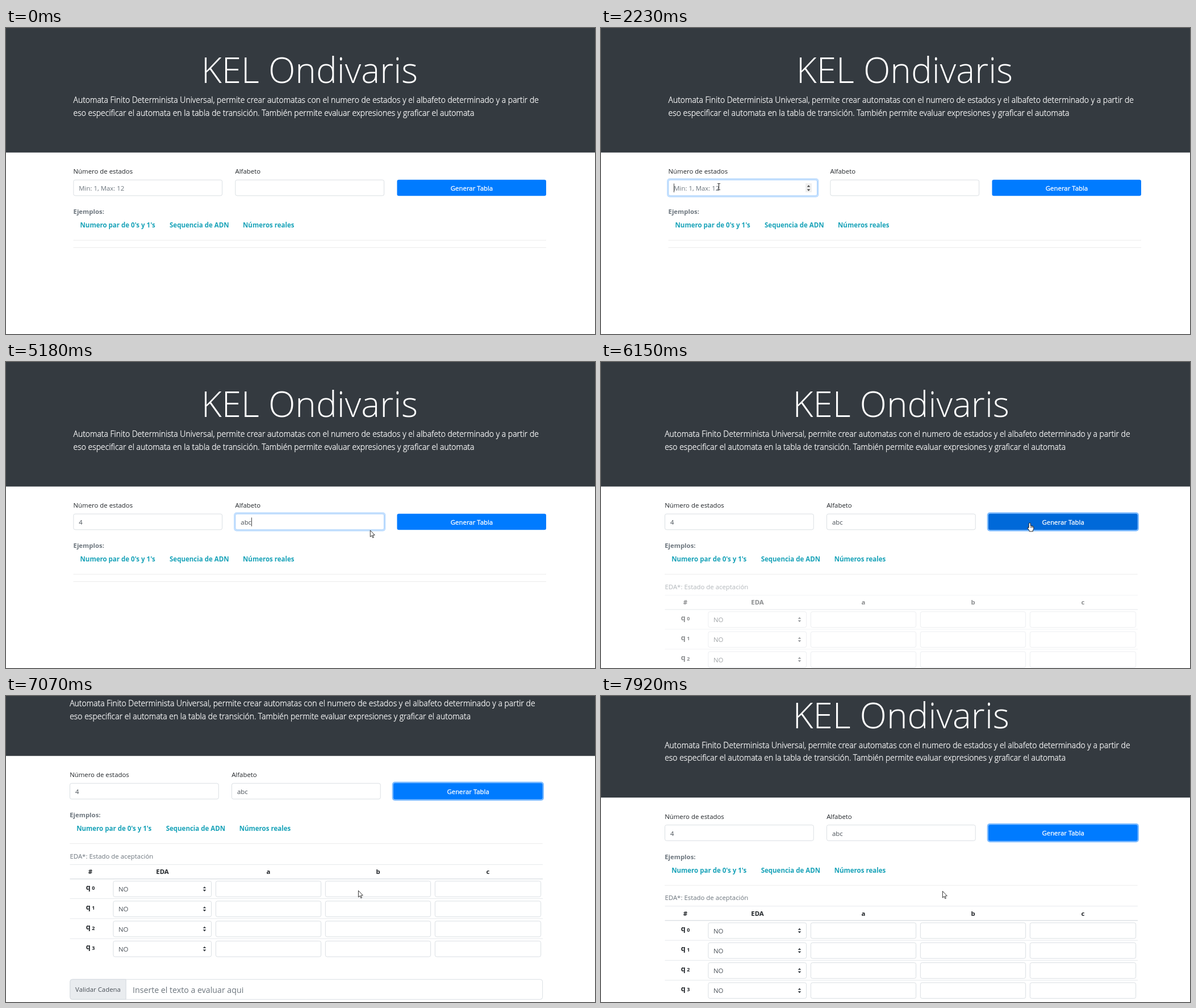
Write an HTML page with a canvas that moves like this. It is 1037x540 px and loops after 8000 ms.

```html
<!DOCTYPE html>
<html lang="es">
<head>
<meta charset="utf-8">
<title>KEL Ondivaris</title>
<style>
html, body { margin: 0; width: 100%; height: 100%; overflow: hidden; background: #fff; }
canvas { display: block; width: 100vw; height: 100vh; }
</style>
</head>
<body>
<canvas id="stage"></canvas>
<script>
const W = 1037, H = 540, LOOP = 8000;
const canvas = document.getElementById('stage');
const ctx = canvas.getContext('2d');

const FONT = '"Open Sans", "Noto Sans", sans-serif';
const INK = '#212529', MUTED = '#6c757d', FIELD = '#495057', EDGE = '#ced4da';
const HAIR = 0.75; // one page pixel at the page zoom

const STATES = { x: 118.5, y: 267.75, w: 262.5, h: 28.5 };
const ALPHABET = { x: 403.5, y: 267.75, w: 262.5, h: 28.5 };
const BUTTON = { x: 688.5, y: 267.75, w: 262.5, h: 28.5 };
const LINKS = [
  { text: "Numero par de 0's y 1's", x: 130.5, y: 339, w: 134, h: 18 },
  { text: 'Sequencia de ADN', x: 288, y: 339, w: 105, h: 18 },
  { text: 'Números reales', x: 417, y: 339, w: 88, h: 18 }
];
const COLUMNS = [['a', 369, 186], ['b', 562, 186], ['c', 755, 187]];
const ROW_TOP = 436.5, ROW_H = 35.25;

// time, x, y of the pointer
const PATH = [
  [380, 874, 507], [620, 640, 440], [820, 400, 382], [960, 256, 350],
  [1160, 205, 280], [1500, 205, 280], [1620, 207.5, 280], [3330, 207.5, 280],
  [3450, 295, 300], [3560, 395, 308], [3720, 504.5, 295], [4800, 504.5, 295],
  [5100, 610, 300], [5480, 755, 284], [6250, 755, 284], [6700, 620, 343],
  [7070, 620, 343], [7150, 622, 343.5], [7640, 622, 343.5], [7920, 601, 344]
];
const HIDDEN = [[0, 380], [2500, 3330], [4270, 4800]];
const CLICKS = [[1240, 1400], [3870, 4120], [5500, 5680]];
const CARET_1 = [[1620, 1760], [2230, 2860], [3160, 3600]];
const CARET_2 = [[3870, 5240]];
const BUILT = 5930, LIVE = 7150;

const clamp = v => Math.max(0, Math.min(1, v));
const ramp = (t, from, to) => clamp((t - from) / (to - from));
const smooth = v => v * v * (3 - 2 * v);
const during = (t, spans) => spans.some(([a, b]) => t >= a && t < b);
const inside = (p, r) => p.x >= r.x && p.x <= r.x + r.w && p.y >= r.y && p.y <= r.y + r.h;

function pointerAt(t) {
  let i = 0;
  while (i < PATH.length - 2 && t >= PATH[i + 1][0]) i++;
  const [t0, x0, y0] = PATH[i], [t1, x1, y1] = PATH[i + 1];
  const k = ramp(t, t0, t1);
  return { x: x0 + (x1 - x0) * k, y: y0 + (y1 - y0) * k };
}

function scrollAt(t) {
  return 114 * smooth(ramp(t, 6775, 7070)) - 73.5 * smooth(ramp(t, 7640, 7920));
}

function text(str, x, y, size, color, weight = 400, align = 'left') {
  ctx.font = `${weight} ${size}px ${FONT}`;
  ctx.textAlign = align;
  ctx.fillStyle = color;
  ctx.fillText(str, x, y);
}

// white text with slightly fuller stems
function lightText(str, x, y, size, weight, align) {
  text(str, x, y, size, '#fff', weight, align);
  ctx.strokeStyle = '#fff';
  ctx.lineWidth = 0.3;
  ctx.lineJoin = 'round';
  ctx.strokeText(str, x, y);
}

function line(x0, x1, y, color, width = HAIR) {
  ctx.fillStyle = color;
  ctx.fillRect(x0, y, x1 - x0, width);
}

function box(r, fill, stroke, radius = 3) {
  ctx.beginPath();
  ctx.roundRect(r.x, r.y, r.w, r.h, radius);
  ctx.fillStyle = fill;
  ctx.fill();
  if (stroke) {
    ctx.beginPath();
    ctx.roundRect(r.x + HAIR / 2, r.y + HAIR / 2, r.w - HAIR, r.h - HAIR, radius);
    ctx.strokeStyle = stroke;
    ctx.lineWidth = HAIR;
    ctx.stroke();
  }
}

function ring(r, alpha) {
  const g = 2.4;
  box({ x: r.x - g, y: r.y - g, w: r.w + 2 * g, h: r.h + 2 * g }, `rgba(0,123,255,${alpha})`, null, 5);
}

function input(r, focus = 0) {
  if (focus > 0) ring(r, 0.25 * focus);
  box(r, '#fff', EDGE);
  if (focus > 0) box(r, '#fff', `rgba(128,189,255,${focus})`);
}

function polygon(points, fill, stroke) {
  ctx.beginPath();
  points.forEach(([x, y]) => ctx.lineTo(x, y));
  ctx.closePath();
  ctx.fillStyle = fill;
  ctx.fill();
  if (stroke) {
    ctx.strokeStyle = stroke;
    ctx.lineWidth = 0.9;
    ctx.lineJoin = 'round';
    ctx.stroke();
  }
}

function arrows(x, y, gap, color) {
  for (const s of [-1, 1])
    polygon([[x - 2.8, y + s * gap], [x + 2.8, y + s * gap], [x, y + s * (gap + 3.2)]], color);
}

function spinner(r) {
  const x = r.x + r.w - 15.5, y = r.y + r.h / 2;
  ctx.fillStyle = '#efefef';
  ctx.fillRect(x - 5.5, y - 8, 11, 16);
  arrows(x, y + 0.5, 2, '#444');
}

function caret(x) {
  ctx.fillStyle = '#444';
  ctx.fillRect(Math.round(x), 274.5, 1, 15.5);
}

function header() {
  ctx.fillStyle = '#343a40';
  ctx.fillRect(-20, 0, W + 40, 219.75);
  text('KEL Ondivaris', 534.5, 97, 62, '#fff', 300, 'center');
  lightText('Automata Finito Determinista Universal, permite crear automatas con el numero de estados y el albafeto determinado y a partir de',
    118.5, 132, 14, 300, 'left');
  lightText('eso especificar el automata en la tabla de transición. También permite evaluar expresiones y graficar el automata',
    118.5, 154.5, 14, 300, 'left');
}

function form(t, p) {
  const focus1 = t < 1620 ? 0 : 1 - ramp(t, 3890, 4050);
  const focus2 = ramp(t, 3890, 4050) * (1 - ramp(t, 5820, 5960));
  const focus3 = ramp(t, 5800, 5880);

  text('Número de estados', 118.5, 257, 11.4, INK);
  text('Alfabeto', 403.5, 257, 11.4, INK);

  input(STATES, focus1);
  if (t < 3160) text('Min: 1, Max: 12', 128.3, 287, 11.4, MUTED);
  else text('4', 128.3, 287, 11.4, FIELD);
  if (inside(p, STATES) || (t >= 1620 && t < 3870)) spinner(STATES);
  if (during(t, CARET_1)) caret(t < 3160 ? 128 : 135);

  const typed = 'abc'.slice(0, [4270, 4570, 4740].filter(k => t >= k).length);
  input(ALPHABET, focus2);
  text(typed, 413.3, 287, 11.4, FIELD);
  if (during(t, CARET_2)) caret(413.3 + ctx.measureText(typed).width);

  if (focus3 > 0) ring(BUTTON, 0.5 * focus3);
  box(BUTTON, inside(p, BUTTON) ? '#0069d9' : '#007bff');
  lightText('Generar Tabla', 820, 286.5, 11.4, 400, 'center');
}

function examples(p) {
  text('Ejemplos:', 118.5, 328, 11.4, MUTED, 700);
  for (const l of LINKS) {
    const over = inside(p, l);
    const color = over ? '#0f6674' : '#17a2b8';
    text(l.text, l.x, 352, 11.5, color, 700);
    if (over) line(l.x, l.x + l.w, 353.5, color);
  }
  line(118.5, 951, 374.25, 'rgba(0,0,0,.1)');
}

function suggestions(t) {
  if (t < 3890 || t >= 4740) return;
  const items = t < 4270 ? ['ab', 'abc', 'fdfd', '01'] : ['ab', 'abc'];
  ctx.save();
  ctx.shadowColor = 'rgba(0,0,0,.35)';
  ctx.shadowBlur = 3;
  ctx.shadowOffsetY = 1;
  ctx.fillStyle = '#fff';
  ctx.fillRect(403.5, 297, 262.5, 12 + 27 * items.length);
  ctx.restore();
  items.forEach((s, i) => text(s, 413, 320.5 + 27 * i, 9.7, INK));
}

const cell = (i, x, w) => ({ x, y: ROW_TOP + 3.75 + i * ROW_H, w, h: 28.5 });

function table(p, live) {
  text('EDA*: Estado de aceptación', 112.5, 400.5, 11.4, MUTED);
  line(112.5, 945, 411, '#dee2e6');
  [['#', 148.5], ['EDA', 275.5], ['a', 462], ['b', 655], ['c', 848.5]]
    .forEach(([s, x]) => text(s, x, 428, 11.4, INK, 700, 'center'));

  for (let i = 0; i < 4; i++) {
    const y = ROW_TOP + i * ROW_H;
    if (live && inside(p, { x: 112.5, y, w: 832.5, h: ROW_H })) {
      ctx.fillStyle = '#ececec';
      ctx.fillRect(112.5, y, 832.5, ROW_H);
    }
    line(112.5, 945, y - 0.5, '#dee2e6', i ? HAIR : 2 * HAIR);
    text('q', 140.8, y + 19, 12.5, INK, 700);
    text(String(i), 151.2, y + 19.5, 9, INK, 700);

    const choice = cell(i, 188.5, 173.5);
    input(choice);
    text('NO', 198, y + 22.5, 11.4, FIELD);
    arrows(349.5, choice.y + 14.3, 1.2, '#343a40');
    for (const [, x, w] of COLUMNS) {
      const r = cell(i, x, w);
      input(r);
      if (live && inside(p, r)) spinner(r);
    }
  }

  const r = { x: 112.5, y: 613.75, w: 832.5, h: 36 };
  box(r, '#fff', EDGE, 4);
  box({ x: r.x, y: r.y, w: 99, h: r.h }, '#e9ecef', EDGE, [4, 0, 0, 4]);
  text('Validar Cadena', 162, 636, 11.4, FIELD, 400, 'center');
  text('Inserte el texto a evaluar aqui', 223, 638, 14.2, MUTED);
}

function pointer(p, kind) {
  ctx.save();
  ctx.translate(p.x, p.y);
  if (kind === 'beam') {
    ctx.fillStyle = '#222';
    ctx.fillRect(-0.5, -6, 1, 12);
    for (const y of [-6, 5.2]) {
      ctx.fillRect(-2.6, y, 2, 0.8);
      ctx.fillRect(0.6, y, 2, 0.8);
    }
  } else if (kind === 'hand') {
    polygon([[-1, 0], [0.6, 0], [1.2, 1], [1.2, 5], [3, 5.2], [5.2, 5.8], [6.8, 7], [6.8, 10.5],
      [5.4, 13], [5.4, 15], [-0.8, 15], [-1.2, 13], [-4, 9.2], [-3.6, 7.6], [-1.8, 8.6], [-1.8, 0.8]], '#fff', '#111');
    ctx.fillStyle = '#111';
    for (const x of [1, 2.9, 4.7]) ctx.fillRect(x, 6, 0.7, 2.8);
  } else {
    polygon([[0.4, 0.4], [0.4, 12], [3, 9.6], [4.8, 13.6], [6.5, 12.9], [4.7, 9], [8.3, 8.8]], '#fff', '#222');
  }
  ctx.restore();
}

function draw(t) {
  ctx.setTransform(canvas.width / W, 0, 0, canvas.height / H, 0, 0);
  ctx.fillStyle = '#fff';
  ctx.fillRect(0, 0, W, H);

  const built = t >= BUILT, live = t >= LIVE;
  const shift = built ? -6.375 : 0, scroll = scrollAt(t);
  const at = pointerAt(t);
  const onPage = { x: at.x, y: at.y + scroll };
  const onForm = t < 380 ? { x: -1, y: -1 } : { x: at.x - shift, y: onPage.y };

  ctx.save();
  ctx.translate(shift, -scroll);
  header();
  form(t, onForm);
  examples(onForm);
  if (!built) line(118.5, 951, 387, 'rgba(0,0,0,.1)');
  suggestions(t);
  ctx.restore();

  if (built) {
    ctx.save();
    ctx.translate(0, -scroll);
    ctx.globalAlpha = smooth(ramp(t, BUILT, BUILT + 430));
    table(onPage, live);
    ctx.restore();
  }

  if (during(t, CLICKS)) {
    ctx.beginPath();
    ctx.arc(at.x - 1.5, at.y, 9.2, 0, 7);
    ctx.fillStyle = 'rgba(253,238,20,.75)';
    ctx.fill();
  }
  if (during(t, HIDDEN)) return;
  const overCell = live && [0, 1, 2, 3].some(i => COLUMNS.some(([, x, w]) => inside(onPage, cell(i, x, w))));
  const beam = overCell || inside(onForm, STATES) || inside(onForm, ALPHABET);
  const hand = inside(onForm, BUTTON) || LINKS.some(l => inside(onForm, l));
  pointer(at, beam ? 'beam' : hand ? 'hand' : 'arrow');
}

function resize() {
  const d = window.devicePixelRatio || 1;
  canvas.width = Math.round(innerWidth * d);
  canvas.height = Math.round(innerHeight * d);
}

addEventListener('resize', resize);
resize();
const start = performance.now();
(function frame() {
  draw((performance.now() - start) % LOOP);
  requestAnimationFrame(frame);
})();
</script>
</body>
</html>
```
